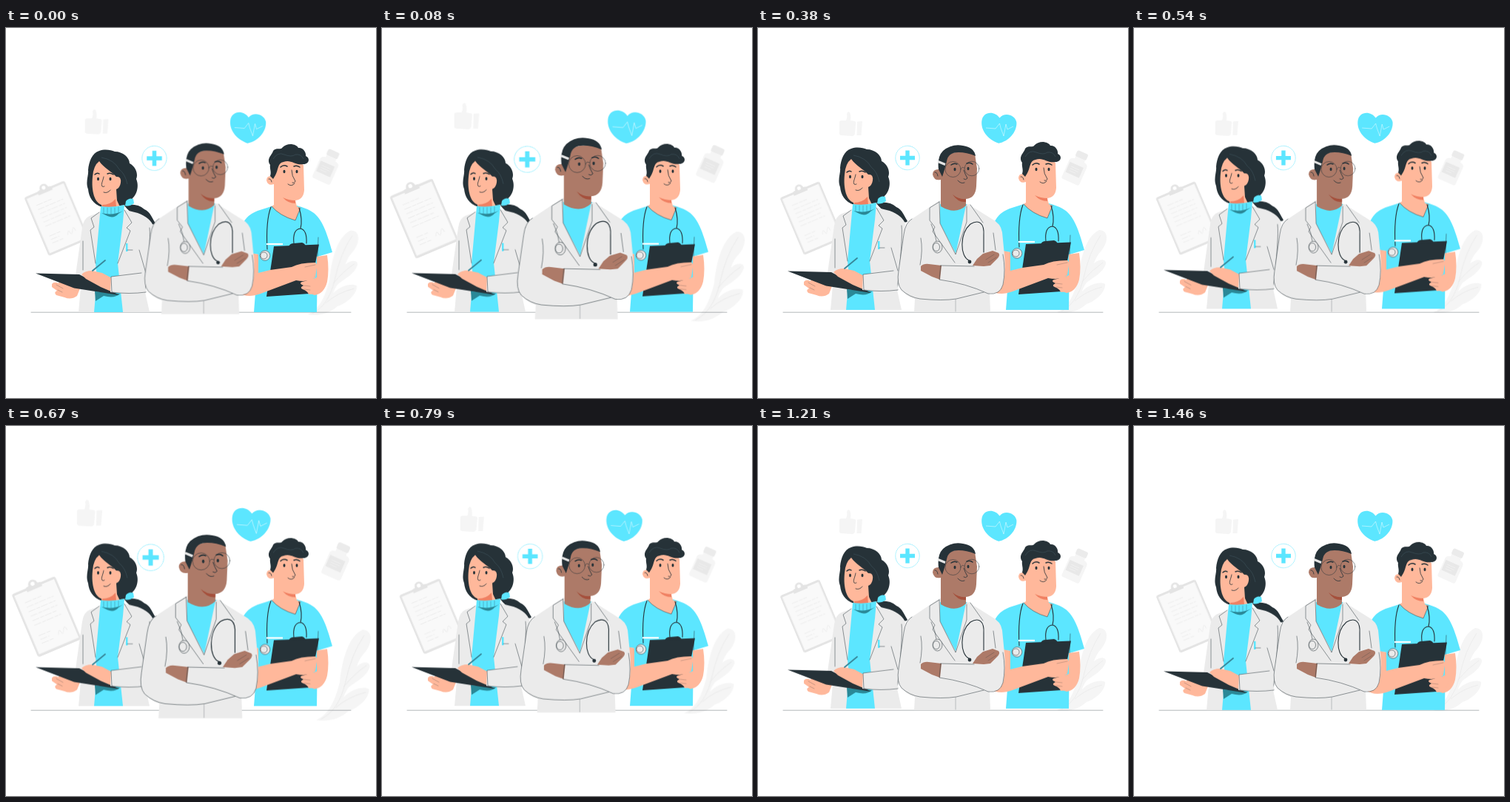
An HTML page that plays this animation: 500 by 500 pixels, repeating every 1.5 s.

```html
<!DOCTYPE html>
<html lang="en">
<head>
<meta charset="utf-8">
<title>Medical team</title>
<style>
html, body { margin: 0; width: 100%; height: 100%; overflow: hidden; background: #fff; }
svg { display: block; width: 100%; height: 100%; }
.cyan { fill: #5ce6ff; }
.dark { fill: #263238; }
.coat { fill: #ebebeb; }
.skin { fill: #ffb89b; }
.brown { fill: #ad7a68; }
.pale { fill: #f5f5f5; }
.mid { fill: #e4e4e4; }
.ink { fill: none; stroke: #263238; stroke-width: .5; stroke-linecap: round; stroke-linejoin: round; }
.brow { stroke-width: 1.5; }
.tube { stroke-width: 1.1; }
.rim { stroke: #263238; stroke-width: .5; }
.fine { fill: none; stroke: #e8e8e8; stroke-width: .7; }
.white { fill: none; stroke: #fff; stroke-width: .6; stroke-linejoin: round; }
</style>
</head>
<body>
<svg viewBox="0 0 500 500">
  <g id="props">
    <!-- thumb -->
    <path class="pale" d="M110 127 Q110 125 113 125 L119 125 Q121 121 120 116 Q121 112 124 114 Q126 118 125 125 L131 126 Q133 127 132 130 L131 143 Q130 146 127 146 L112 145 Q109 144 110 141Z"/>
    <path class="pale" d="M134 126.500 L141 126 L139.500 145 L133.500 145Z"/>
    <!-- chart -->
    <g transform="translate(72.500 257) rotate(-23)">
      <rect class="mid" x="-29" y="-42" width="58" height="84" rx="3"/>
      <rect x="-26.500" y="-39" width="53" height="78" fill="#f9f9f9"/>
      <path class="mid" d="M-10 -37 V-41 Q-10 -43 -6 -43 Q-5 -49 0 -49 Q5 -49 6 -43 Q10 -43 10 -41 V-37Z"/>
      <circle cy="-44" r="2.500" fill="#fff"/>
      <path class="fine" stroke-dasharray="9 1.500 5 1" d="M-18 -26H4M-18 -20H18M-18 -14H18M-18 -8H18M-18 -2H14M-18 4H18M-18 18H-2M-18 23H-6M-18 28H-2"/>
      <path class="fine" d="M5 26 Q8 18 9 24 T13 23 T17 25"/>
    </g>
    <!-- bottle -->
    <g transform="translate(430 189) rotate(24)">
      <rect x="-8" y="-23" width="16" height="9" rx="2.500" fill="#ebebeb"/>
      <path class="pale" d="M-7 -14 H7 V-11 Q13 -10 13 -6 V18 Q13 21 10 21 H-10 Q-13 21 -13 18 V-6 Q-13 -10 -7 -11Z"/>
      <rect x="-11" y="-4" width="20" height="15" fill="#e8e8e8"/>
      <path class="fine" d="M-7 1H5M-7 4H5M-7 7H2" style="stroke:#f2f2f2"/>
    </g>
    <!-- leaves -->
    <g>
      <path class="pale" d="M404 384 C420 378 428 358 433 338 C436 309 444 281 461 273 C474 273 474 289 464 301 C459 306 456 312 454 318 C462 311 471 312 470 319 C466 331 453 337 444 344 C440 350 439 352 438 356 C447 346 463 342 469 346 C470 358 454 370 444 373 C434 382 420 387 404 384Z"/>
      <path class="fine" d="M410 383 Q432 372 440 338 Q447 304 463 280M438 343 Q451 327 466 317M428 369 Q444 355 465 350"/>
    </g>
  </g>

  <g id="signs">
    <circle cx="202" cy="175.500" r="16.200" fill="#fff" stroke="#5ce6ff" stroke-width=".7" stroke-dasharray="1.600 .6"/>
    <path class="cyan" d="M199.300 165.500h5.400v7.300h7.300v5.400h-7.300v7.300h-5.400v-7.300h-7.300v-5.400h7.300z"/>
    <path class="cyan" d="M325 155.700 C311 151 301 139 302.300 126 C303.500 113 319 111 326.500 121.500 C333 113.500 347 117 349.300 127 C350.500 139 340 153 325 155.700Z"/>
    <path class="white" d="M308 135 L321 136 L326.500 129 L328 135 L332 146 L335 130 L337 137 L345 133" stroke-opacity=".8"/>
  </g>

  <path class="ink" d="M34 384.200H466" stroke-opacity=".7"/>

  <g id="woman">
    <path class="dark" d="M111 218 C107 208 112 199 111 192 C112 181 116 169 126 166 C134 163 142 165 147 167 C158 167 167 175 167 183 C175 187 179 197 176 204 C180 213 177 225 171 230 L166 239 L130 242 C117 238 112 228 111 218Z"/>
    <path class="dark" d="M162 239 Q178 237 187 245 C195 248 198 258 202 264 Q200 267 195 264 C183 259 168 251 160 240Z"/>
    <path class="cyan" d="M162 234 Q166 229 172 231 L173 237 Q166 242 161 240Z"/>
    <path class="skin" d="M117 201 Q118 186 126 180 C132 189 143 194 149 201 Q156 200 155 209 Q154 216 149 218 L150 233 L156 246 H130 L129 239 C120 236 115 221 117 201Z"/>
    <path d="M130 239 Q141 239 148 231 L149 242 H130Z" fill="#f08062"/>
    <path class="ink" d="M132 201 C131 207 128 211 130 214 Q131 215 133 214M132 222 Q137 224 141 219" style="stroke-width:.8"/>
    <path class="ink brow" d="M120 198 Q123 195 126 197M137 197 Q141 195 145 198"/>
    <g class="dark"><ellipse cx="124.500" cy="204" rx="1.500" ry="2.200"/><ellipse cx="141" cy="204" rx="1.500" ry="2.200"/></g>
    <path d="M129 175 Q146 178 153 191 Q161 197 164 211" fill="none" stroke="#455a64" stroke-width=".5"/>
    <path class="coat" d="M127 249 L113 254 Q105 257 103 270 L94 334 L102 340 L98 384 H194 L188 357 L199 268 Q196 257 178 250 L158 245Z"/>
    <path class="cyan" d="M128 241 Q145 243 160 239 L158 262 L151 318 L158 384 H119 L123 338 L121 318Z"/>
    <path d="M132 243v7M137 243v8M142 243v8M147 243v8M152 242v7" class="ink" stroke-opacity=".55"/>
    <path d="M129 250 Q145 254 158 247 L152 251 Q146 258 137 254Z" fill="#2a8897"/>
    <path class="ink" d="M126 249 L115 257 L119 269 L114 273 L121 318M160 246 L170 263 L163 270 L168 274 L151 318M104 288 L104 327M180 300 L189 331M194 270 Q196 290 188 357"/>
    <path class="cyan" d="M162 291h2.500v11h-2.500z"/>
    <path class="ink" d="M164 300h7"/>
    <path d="M120 356 L154 359 Q147 366 132 362 L121 369Z" fill="#2a8897"/>
    <path class="skin" d="M62 346 Q65 342 71 345 L73 340 Q80 336 84 347 L100 352 L96 362 Q88 368 79 364 L68 361 Q64 357 69 355 L62 350Z"/>
    <path class="ink" d="M68 347 L77 352M70 354 L76 357" stroke-opacity=".5"/>
    <path class="dark" d="M40 331.500 L99 333 L153 361 L92 351.500Z"/>
    <path class="skin" d="M102 333 Q107 328 116 328 L130 331 L143 338 L142 356 L128 350 L108 339Z"/>
    <path d="M117 328 L134 314" stroke="#37879a" stroke-width="1.800" stroke-linecap="round"/>
    <path class="coat" d="M142 336 L183 330 L190 357 Q165 360 141 357Z"/>
    <path class="ink" d="M183 331 L142 336 L143 357 Q166 360 189 357"/>
  </g>

  <g id="man">
    <path class="cyan" d="M362 240 L340 247 Q322 254 318 270 L326 304 L341 306 L335 384 H420 L421 309 L441 303 C433 274 427 259 416 250 Q408 244 393 240Z"/>
    <path class="skin" d="M364 178 Q380 174 402 185 L403 219 Q402 232 391 233 L393 241 L398 243 L391 260 Q370 254 359 241 L362 239 L362 211 Q354 214 352 206 Q352 199 360 200Z"/>
    <path d="M374 229 Q382 233 391 233 V237 Q381 237 374 229Z" fill="#f08062"/>
    <path class="dark" d="M361 204 L357 200 C359 194 356 190 357 185 C351 177 360 171 361 166 C365 161 371 165 373 162 C380 154 393 157 395 162 C402 161 406 169 405 173 C412 176 409 184 402 184 C391 186 385 177 375 181 C367 182 368 192 364 199Z"/>
    <path d="M361 177 Q367 167 376 171 Q386 175 391 171 Q399 170 402 177" fill="none" stroke="#455a64" stroke-width=".5"/>
    <path class="ink" d="M386 192 Q386 200 391 207 Q390 210 387 209M381 211 Q386 215 390 210M355 204 Q358 203 359 208" style="stroke-width:.8"/>
    <path class="ink brow" d="M371 188 Q375 184 380 187M389 187 Q393 185 397 188"/>
    <g class="dark"><ellipse cx="376" cy="194" rx="1.500" ry="2.200"/><ellipse cx="393" cy="194" rx="1.500" ry="2.200"/></g>
    <path class="ink" d="M359 241 Q370 254 391 260 L398 243M422 283 L421 309"/>
    <path class="ink tube" d="M358 242 Q351 260 353 299M396 243 Q401 259 398 271M389 291 Q387 272 398 271 Q407 273 406 291"/>
    <path d="M352 292h22" stroke="#fff" stroke-width="2.200"/>
    <path class="skin" d="M420 309 L434 307 Q437 327 434 343 Q430 359 417 361 L398 354 L397 347 L420 337Z"/>
    <path class="dark" d="M362 295 L423 292.500 L410 359 L352 363Z"/>
    <path class="dark" d="M382 296 Q383 291 389 291 L400 290 Q404 291 405 295Z"/>
    <path class="skin" d="M326 303 L341 306 L341 331 L357 327 L386 323 Q397 317 418 317 Q421 319 420 324 L418 337 Q409 344 392 341 L344 359 Q325 366 314 357Z"/>
    <path class="skin" d="M400 343 Q409 341 414 338 L426 343 L420 359 L409 360 Q408 356 401 353 Q396 351 402 348 Q395 345 400 343Z"/>
    <path class="ink" d="M404 323 L418 320M402 348 L411 349M403 353 L411 354" stroke-opacity=".45"/>
    <circle class="mid rim" cx="350" cy="307.500" r="6.800"/>
    <circle class="coat rim" cx="348.500" cy="307.500" r="4.500"/>
  </g>

  <g id="doctor">
    <path class="coat" d="M245 233 L232 242 L208 258 Q199 263 197 279 L190 328 Q187 346 194 354 Q201 363 212 366 L211 384 H314 L313 358 Q328 361 332 344 Q335 327 333 307 L330 276 Q328 264 316 258 L284 238Z"/>
    <path class="cyan" d="M246 238 L282 238 L284 262 L267 306 L246 264Z"/>
    <path class="brown" d="M250 176 Q264 163 293 170 L296 190 L295 214 Q294 230 281 231 L281 240 Q267 253 247 241 L247 205 Q238 207 236 198 Q236 190 246 191Z"/>
    <path d="M263 225 Q271 232 281 231 V235 Q270 236 263 225Z" fill="#a5503c"/>
    <path class="dark" d="M244 191 Q242 174 250 166 Q262 156 277 159 Q292 161 294 173 Q282 168 271 168 Q257 168 255 180 Q253 189 249 201Z"/>
    <path d="M243.500 180.500 L253 184.500" stroke="#e6e6e6" stroke-width="3"/>
    <g class="ink"><circle cx="263.500" cy="191" r="10.500"/><circle cx="289" cy="190" r="9.800"/><path d="M274 190 Q276 187 279 189"/></g>
    <path class="ink" d="M278 192 Q280 198 283 203 Q281 206 278 204M270 206 Q274 211 279 209M239 195 Q242 194 243 200" style="stroke-width:.8"/>
    <path class="ink brow" d="M261 185 Q265 182 269 184M282 183 Q287 181 290 184"/>
    <g class="dark"><ellipse cx="266" cy="191" rx="1.500" ry="2.200"/><ellipse cx="284" cy="190" rx="1.500" ry="2.200"/></g>
    <path class="coat" d="M245 234 L232 242 L231 259 L238 270 L235 276 L267 318 L268 306 L246 264Z"/>
    <path class="coat" d="M281 240 L287 238 L300 259 L291 275 L269 312 L267 306Z"/>
    <path class="ink" d="M245 235 L232 243 L232 260 L239 269 L236 275 L266 317M245 235 L246 264 L267 306 L282 262 V241M287 239 L304 263"/>
    <path class="ink" d="M267 367V383" stroke-opacity=".5"/>
    <path class="ink" d="M208 258 Q199 263 197 279 L190 328 Q187 346 194 354 Q205 364 219 366 Q250 369 268 366 L305 357M220 284 Q223 300 219 320M318 277 L321 300"/>
    <path class="brown" d="M220 322 Q224 318 231 319 L248 321 L246 340 L235 336 L220 328Z"/>
    <path class="ink" d="M247 321 L292 322 M247 321 L245 340 Q281 345 311 359 Q327 361 331 347 Q335 328 331 306"/>
    <path class="brown" d="M290 321 L296 312 L304 305 L317 301 L325 304 Q328 307 323 312 L314 321 L305 322Z"/>
    <path class="ink" d="M308 313 L319 306M311 317 L322 310" stroke-opacity=".5"/>
    <path class="ink tube" d="M285 314 C273 309 272 278 287 265 C299 258 306 264 305 280 L305 303"/>
    <path class="ink" d="M234 265 Q240 277 241 288"/>
    <circle class="dark" cx="286" cy="316" r="2.400"/>
    <ellipse class="mid rim" cx="242.500" cy="296" rx="6.500" ry="8"/>
    <ellipse class="coat rim" cx="241" cy="296" rx="4.500" ry="5.500"/>
  </g>
</svg>
<script>
const LOOP = 1500;
const play = (id, frames, delay = 0) =>
  document.getElementById(id).animate(frames, { duration: LOOP, iterations: Infinity, delay });

// Two heartbeats: time in ms, scale, easing to the next step
const beat = [
  [0, 1, 'ease-out'], [145, 1.1, 'ease-in-out'], [365, 1, 'linear'],
  [560, 1, 'ease-out'], [673, 1.1, 'ease-in-out'], [893, 1, 'linear'], [LOOP, 1, 'linear']
];
const pulse = (id, x, y) => {
  const el = document.getElementById(id);
  el.style.transformOrigin = `${x}px ${y}px`;
  play(id, beat.map(([t, s, easing]) => ({ offset: t / LOOP, transform: `scale(${s})`, easing })), -20);
};
const bob = id => play(id, [0, -6, 0].map(y => ({
  transform: `translateY(${y}px)`, easing: 'cubic-bezier(.3,.15,.7,.85)'
})));

pulse('props', 252, 250);
pulse('signs', 268, 153);
pulse('doctor', 261, 272);
bob('woman');
bob('man');
</script>
</body>
</html>
```
